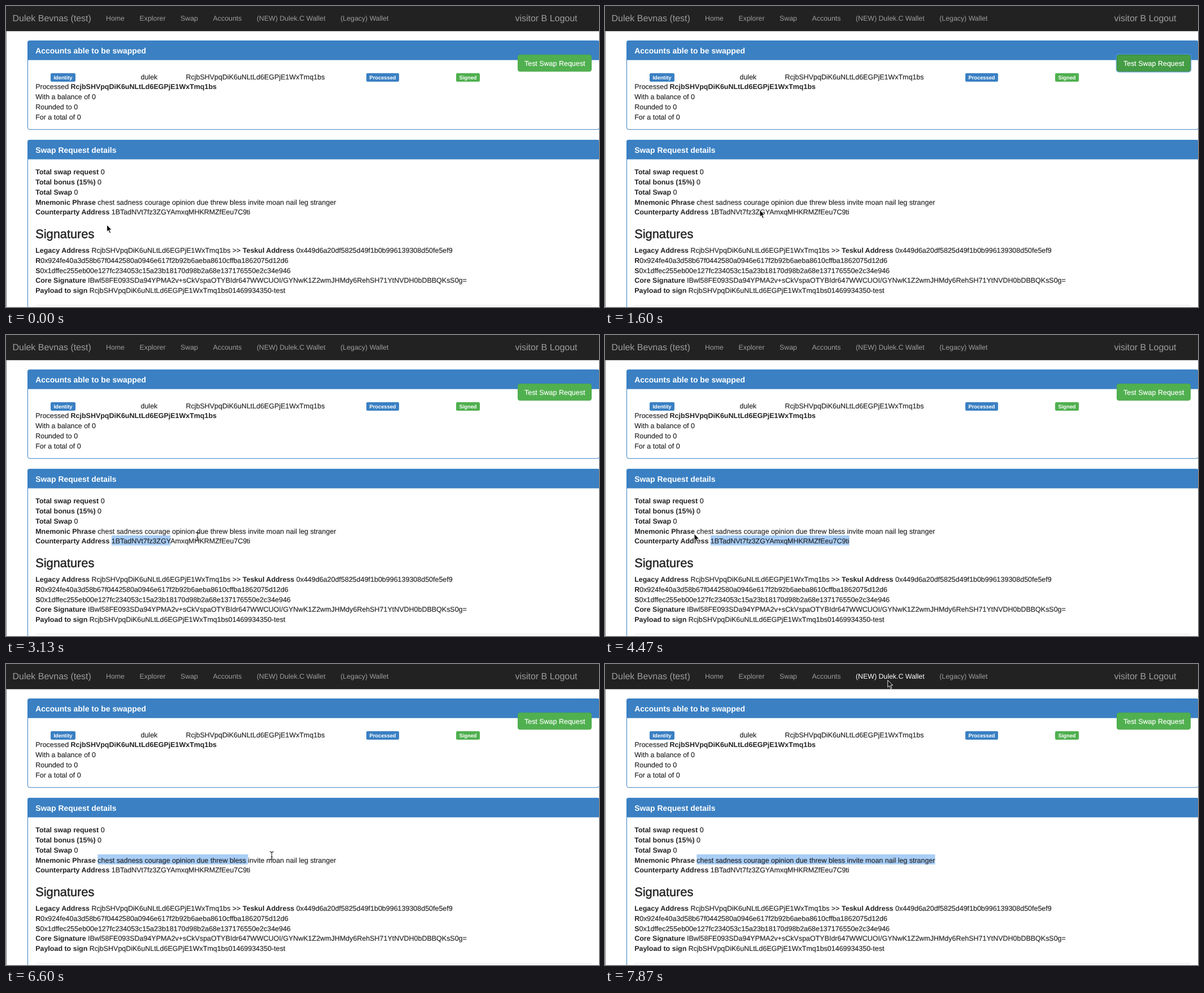
Write an HTML page that moves like this. It is 1050x533 px and loops after 8 s.

```html
<!DOCTYPE html>
<html lang="en">
<head>
<meta charset="utf-8">
<title>Swap request</title>
<style>
  html, body { margin: 0; width: 100%; height: 100%; overflow: hidden; background: #fff; }
  svg { display: block; width: 100vw; height: 100vh; }
  text { font: 12.47px "Liberation Sans", Arial, sans-serif; fill: #222; white-space: pre; text-rendering: geometricPrecision; }
  .body { stroke: #222; stroke-width: .15px; }
  .b { font-weight: bold; stroke: none; }
  .nav { font-size: 12.35px; fill: #9d9d9d; }
  .hover { fill: #fff; }
  .brand { font-size: 15.98px; fill: #9d9d9d; }
  .title { font-size: 13.95px; font-weight: bold; fill: #fff; }
  .tag { font-size: 9.32px; font-weight: bold; fill: #fff; text-anchor: middle; }
  .head { font-size: 21.8px; stroke: #222; stroke-width: .45px; }
  .button { fill: #fff; stroke: #fff; stroke-width: .15px; text-anchor: middle; }
</style>
</head>
<body>
<svg id="stage" viewBox="0 0 1050 533" preserveAspectRatio="none"></svg>
<script>
const LOOP = 8000, FPS = 15, LINE = 17.75, LEFT = 52.2;
const BLUE = '#3a80c3', GREEN = '#50b04f', MARK = '#a9cef7';
const ACCOUNT = 'RcjbSHVpqDiK6uNLtLd6EGPjE1WxTmq1bs';
const PHRASE = 'chest sadness courage opinion due threw bless invite moan nail leg stranger';
const ADDRESS = '1BTadNVt7fz3ZGYAmxqMHKRMZfEeu7C9ti';
const stage = document.getElementById('stage');

function add(tag, attrs, parent = stage) {
  const el = document.createElementNS('http://www.w3.org/2000/svg', tag);
  for (const k in attrs) el.setAttribute(k, attrs[k]);
  parent.appendChild(el);
  return el;
}

function rect(x, y, width, height, fill, more) {
  return add('rect', { x, y, width, height, fill, ...more });
}

function label(x, y, str, cls, more) {
  const el = add('text', { x, y, class: cls, ...more });
  el.textContent = str;
  return el;
}

// Running text; parts between asterisks are bold.
function row(y, str) {
  const el = add('text', { x: LEFT, y, class: 'body' });
  str.split('*').forEach((part, i) => {
    add('tspan', i % 2 ? { class: 'b' } : {}, el).textContent = part;
  });
  return el;
}

function rows(y, list) {
  return list.map((str, i) => row(y + i * LINE, str));
}

// The right edge lies just outside the stage.
function panel(y, height, title) {
  rect(38.5, y + .5, 1012, height - 1, '#fff', { rx: 3.5, stroke: BLUE });
  add('path', { d: `M38 ${y + 34.6}V${y + 3.5}q0-3.5 3.5-3.5H1047.5q3.5 0 3.5 3.5V${y + 34.6}Z`, fill: BLUE });
  label(LEFT, y + 23, title, 'title');
}

function tag(x, width, str, fill) {
  rect(x, 119, width, 15, fill, { rx: 2.2 });
  label(x + width / 2, 129.8, str, 'tag');
}

// Navigation bar
rect(0, 0, 1050, 44.3, '#222');
rect(0, 43.4, 1050, .9, '#101010');
rect(0, 44.3, 1, 489, '#777');
label(11.5, 27, 'Dulek Bevnas (test)', 'brand');
let navX = 177;
const links = ['Home', 'Explorer', 'Swap', 'Accounts', '(NEW) Dulek.C Wallet', '(Legacy) Wallet'].map(str => {
  const el = label(navX, 26, str, 'nav');
  navX += el.getComputedTextLength() + 26.6;
  return el;
});
label(1011.5, 27, 'visitor B Logout', 'brand', { 'text-anchor': 'end' });

// Accounts panel
panel(61.2, 158, 'Accounts able to be swapped');
tag(79, 44, 'Identity', BLUE);
tag(638, 58, 'Processed', BLUE);
tag(797, 42, 'Signed', GREEN);
label(238.5, 129.8, 'dulek', 'body');
label(318.5, 129.8, ACCOUNT, 'body');
rows(147.4, [`Processed *${ACCOUNT}*`, 'With a balance of 0', 'Rounded to 0', 'For a total of 0']);

const glow = add('g', {});
for (const grow of [2.6, 1.6, .7])
  add('rect', { x: 906.5 - grow, y: 86.6 - grow, width: 130 + 2 * grow, height: 29.2 + 2 * grow,
    rx: 3.5 + grow, fill: '#5b9de0', opacity: 1.1 - grow / 3 }, glow);
const button = rect(906.5, 86.6, 130, 29.2, GREEN, { rx: 3.5, stroke: '#4aa94a' });
label(971.7, 105.7, 'Test Swap Request', 'button');

// Details panel
panel(236.9, 400, 'Swap Request details');
const phraseMark = rect(0, 337.1, 0, LINE, MARK);
const addressMark = rect(0, 337.1 + LINE, 0, LINE, MARK);
const [, , , phraseRow, addressRow] = rows(298.3, [
  '*Total swap request* 0',
  '*Total bonus (15%)* 0',
  '*Total Swap* 0',
  `*Mnemonic Phrase* ${PHRASE}`,
  `*Counterparty Address* ${ADDRESS}`
]);
label(LEFT, 411, 'Signatures', 'head');
rows(437, [
  `*Legacy Address* ${ACCOUNT} >> *Teskul Address* 0x449d6a20df5825d49f1b0b996139308d50fe5ef9`,
  '*R*0x924fe40a3d58b67f0442580a0946e617f2b92b6aeba8610cffba1862075d12d6',
  '*S*0x1dffec255eb00e127fc234053c15a23b18170d98b2a68e137176550e2c34e946',
  '*Core Signature* IBwl58FE093SDa94YPMA2v+sCkVspaOTYBIdr647WWCUOI/GYNwK1Z2wmJHMdy6RehSH71YtNVDH0bDBBQKsS0g=',
  `*Payload to sign* ${ACCOUNT}01469934350-test`
]);
rect(LEFT, 529.5, 985, 1, '#e6e6e6');

// Pointers: arrow anchored at its tip, text beam at its centre
const arrow = add('path', {
  d: 'M0 0V12.4L2.8 9.8L5 14.9L7.1 14L4.9 9H8.8Z',
  fill: '#111', stroke: '#fff', 'stroke-width': .9, 'stroke-linejoin': 'round'
});
const beam = add('path', {
  d: 'M-3.5-7Q-.5-7 0-5Q.5-7 3.5-7M0-5V5M-3.5 7Q-.5 7 0 5Q.5 7 3.5 7M-1.6 2.2H1.6',
  fill: 'none', stroke: '#333', 'stroke-width': 1.1
});

// Pointer moves; it rests between them.
const HOME = { x: 178.5, y: 387.5 };
const MOVES = [
  { from: 130, to: 730, x: 190, y: 362 },
  { from: 1200, to: 1600, x: 274, y: 361 },
  { from: 1600, to: 1930, x: 189, y: 361 },
  { from: 2800, to: 3400, x: 450, y: 353 },
  { from: 3730, to: 4070, x: 389, y: 355 },
  { from: 4270, to: 4470, x: 158, y: 352 },
  { from: 4470, to: 4930, x: 163, y: 333 },
  { from: 5070, to: 5600, x: 166, y: 345.5 },
  { from: 6000, to: 6830, x: 541, y: 338 },
  { from: 6870, to: 7330, x: 597, y: 347 },
  { from: 7470, to: 7670, x: 974, y: 477 },
  { from: 7670, to: 7870, x: 500.7, y: 28.7 }
];
// The highlight trails the pointer.
const LAG = 70;

function ease(u) {
  return u * u * (3 - 2 * u);
}

function pointer(t) {
  let { x, y } = HOME;
  for (const m of MOVES) {
    const u = ease(Math.min(1, Math.max(0, (t - m.from) / (m.to - m.from))));
    x += (m.x - x) * u;
    y += (m.y - y) * u;
  }
  return { x, y };
}

// Highlights the whole characters of str that the drag has passed.
function select(mark, text, str, t, from, to, cleared) {
  const first = text.textContent.indexOf(str);
  const left = text.getStartPositionOfChar(first).x;
  let right = left;
  if (t >= from && t < cleared) {
    const { x } = pointer(Math.min(t - LAG, to));
    for (let i = 0; i < str.length; i++) {
      const end = text.getEndPositionOfChar(first + i).x;
      if (end <= x) right = end;
    }
  }
  mark.setAttribute('x', left);
  mark.setAttribute('width', right - left);
}

function show(el, on) {
  el.setAttribute('visibility', on ? 'visible' : 'hidden');
}

function draw(time) {
  const t = Math.round(Math.floor((time % LOOP + 4) * FPS / 1000) * 100 / FPS) * 10;
  const { x, y } = pointer(t);
  const isBeam = t >= 2530 && t < 4330 || t >= 5530 && t < 7530;
  for (const el of [arrow, beam]) el.setAttribute('transform', `translate(${x} ${y})`);
  show(beam, isBeam);
  show(arrow, !isBeam);

  const focused = t >= 1270 && t < 2870;
  show(glow, focused);
  button.setAttribute('fill', focused ? '#449d44' : GREEN);
  button.setAttribute('stroke', focused ? '#398439' : '#4aa94a');

  select(addressMark, addressRow, ADDRESS, t, 2870, 3470, 5870);
  select(phraseMark, phraseRow, PHRASE, t, 6070, 7330, LOOP);
  links[4].classList.toggle('hover', t >= 7870);
}

const start = performance.now();
function tick() {
  draw(performance.now() - start);
  requestAnimationFrame(tick);
}
tick();
</script>
</body>
</html>
```
